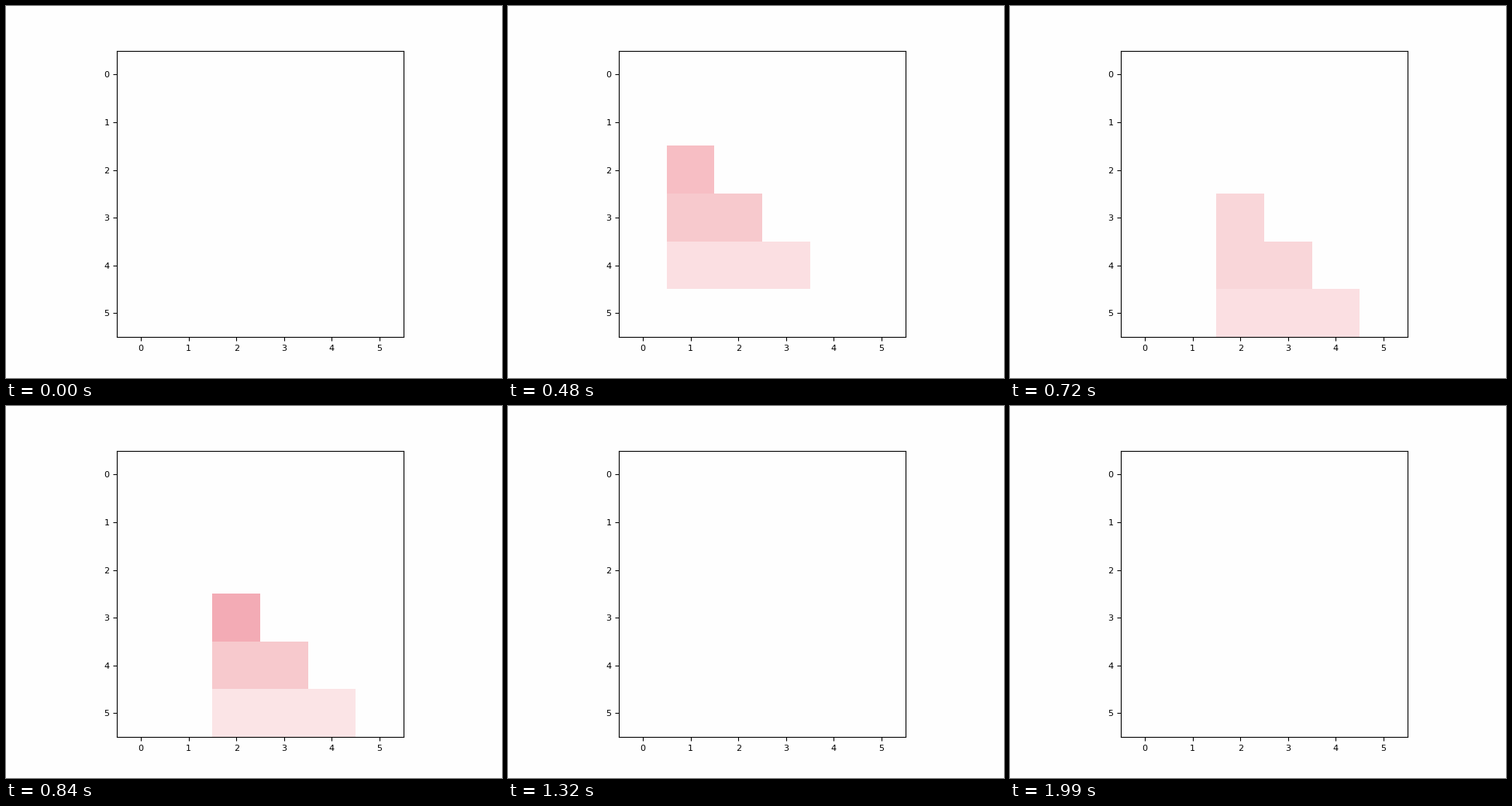
These frames come from a looping animation (640x480 px, 3.17 s). A matplotlib script:

```python
import numpy as np
import matplotlib.pyplot as plt
from matplotlib.animation import FuncAnimation
from matplotlib.colors import LinearSegmentedColormap

N = 6
LOOP, TICK = 3170, 10      # ms
STEP, LAST = 30, 8         # ms per step, last step of a pass
PAPER = "#fefefe"

plt.rcParams.update({"font.family": "DejaVu Sans", "font.size": 8})

cmap = LinearSegmentedColormap.from_list("belief", [
    (0.00, PAPER), (0.07, "#fceded"), (0.12, "#fbdfe2"), (0.20, "#f7c9cd"),
    (0.24, "#f7bec4"), (0.50, "#e87084"), (1.00, "#c0003c")], N=1024)


def triangle(low, rows):
    """Fill the cells low <= column < row, one value per row."""
    grid = np.zeros((N, N))
    for n, value in enumerate(rows):
        row = low + 1 + n
        grid[row, low:row] = value
    return grid


def shrink(low, s):
    """Spread-out belief that contracts to the top cell of the triangle."""
    m = 8 - s if s <= 5 else 3 - (s - 5) * 2 / 3
    n = np.arange(N - 1 - low)
    w = np.clip(m * (m + 1) - n * (n + 1), 0, None)
    return triangle(low, w / np.sum(w * (n + 1)))


def blend(s, *poses):
    """Piecewise linear path through poses at the start, middle and end."""
    return [np.interp(s, (0, LAST / 2, LAST), values) for values in zip(*poses)]


def settle(s):
    """Belief drifting into the bottom right cell."""
    grid = np.zeros((N, N))
    grid[4, 3], grid[5, 3], grid[5, 4] = blend(
        s, (1 / 3, 1 / 3, 1 / 3), (0, 0.07, 1), (0, 0, 1))
    return grid


def belief(t):
    def step(start):
        return min((t - start) // STEP, LAST)

    if 330 <= t < 600:
        return shrink(1, step(330))
    if 600 <= t < 870:
        return triangle(2, blend(step(600), (1 / 6, 1 / 6, 1 / 6),
                                 (0.152, 0.152, 0.12), (0.3, 0.2, 0.1)))
    if 870 <= t < 1320:
        return settle(step(870))
    if 1510 <= t < 1990:
        return shrink(0, step(1510))
    return np.zeros((N, N))


fig, ax = plt.subplots(figsize=(6.4, 4.8), dpi=100, facecolor=PAPER)
ax.set_facecolor(PAPER)
image = ax.imshow(belief(0), cmap=cmap, vmin=0, vmax=1, interpolation="nearest")
ax.set_xticks(range(N))
ax.set_yticks(range(N))


def update(i):
    image.set_data(belief(i * TICK))
    return [image]


anim = FuncAnimation(fig, update, frames=LOOP // TICK, interval=TICK,
                     repeat=True, repeat_delay=0)
plt.show()
```
